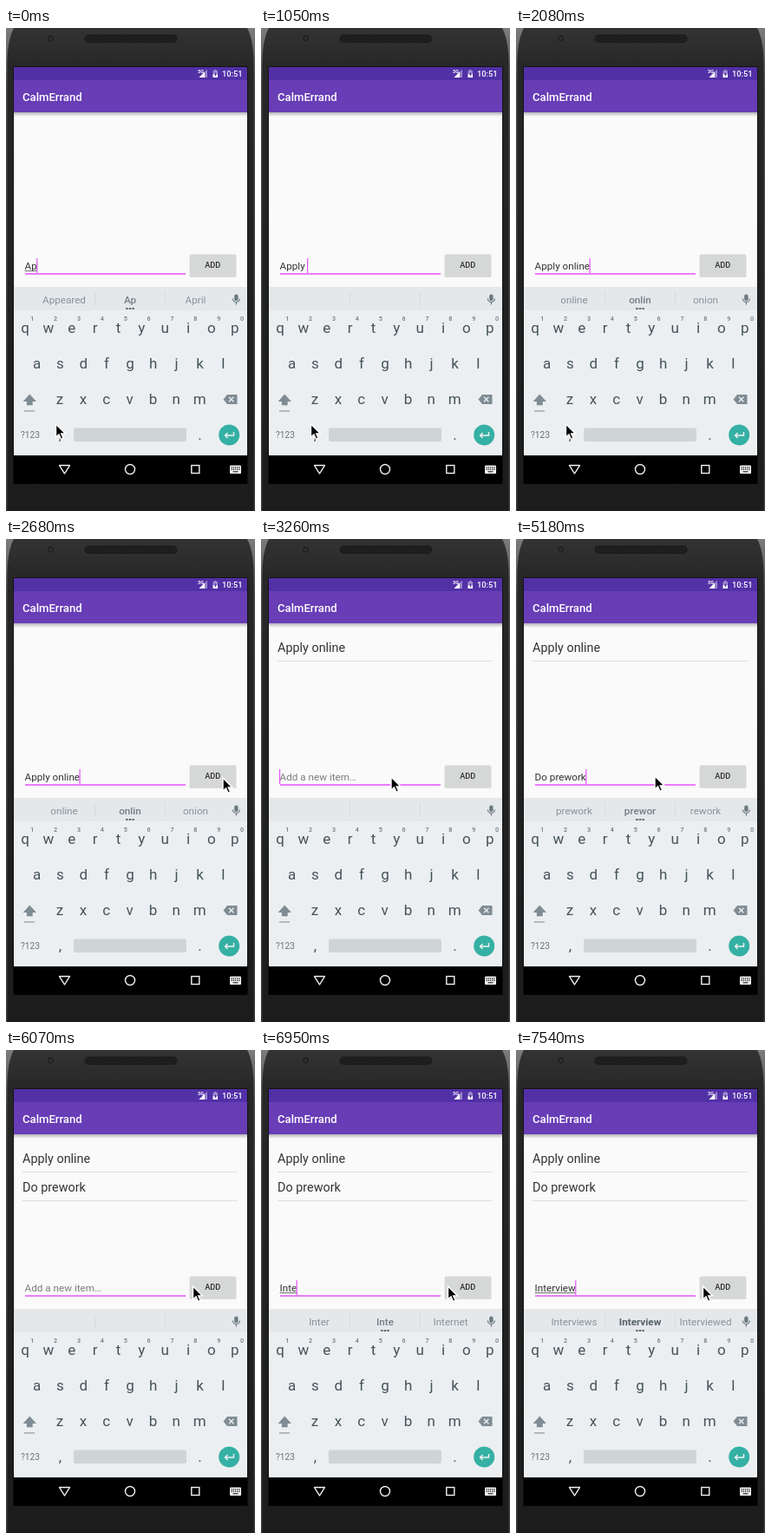
These frames come from a looping animation (287 by 556 pixels, 7990 ms). An HTML page:

```html
<!DOCTYPE html>
<html lang="en">
<head>
<meta charset="utf-8">
<title>To-do list demo</title>
<style>
html, body { margin: 0; width: 100%; height: 100%; overflow: hidden; background: #1d1d1d; }
svg { display: block; width: 287px; height: 556px; font-family: Roboto, sans-serif; }
text { white-space: pre; }
.mid { text-anchor: middle; }
.key { font-size: 17px; fill: #45535a; }
.digit { font-size: 7.2px; font-weight: 500; fill: #6c7a80; }
.hint { font-size: 11.7px; fill: #899298; }
.line { fill: none; stroke: #f2f2f2; stroke-width: 1.4; }
</style>
</head>
<body>
<svg viewBox="0 0 287 556">
  <defs>
    <linearGradient id="rim" x2="0" y2="1">
      <stop offset="0" stop-color="#7c7c7c"/>
      <stop offset=".12" stop-color="#4a4a4a"/>
      <stop offset="1" stop-color="#3c3c3c"/>
    </linearGradient>
    <linearGradient id="body" x2="0" y2="1">
      <stop offset="0" stop-color="#333"/>
      <stop offset=".08" stop-color="#272727"/>
      <stop offset="1" stop-color="#1c1c1c"/>
    </linearGradient>
    <linearGradient id="shade" x2="0" y2="1">
      <stop offset="0" stop-opacity=".28"/>
      <stop offset="1" stop-opacity="0"/>
    </linearGradient>
    <pattern id="mesh" width="4" height="4" patternUnits="userSpaceOnUse">
      <rect width="4" height="4" fill="#191919"/>
      <path d="M0 0L4 4M4 0L0 4" stroke="#262626" stroke-width=".8"/>
    </pattern>
  </defs>

  <!-- phone -->
  <rect width="287" height="556" fill="url(#rim)"/>
  <path d="M1.500 556V42Q1.500 14 9 0H278Q285.500 14 285.500 42V556Z" fill="url(#body)"/>
  <circle cx="51.500" cy="12" r="4.300" fill="#222" stroke="#363636"/>
  <circle cx="51.500" cy="12" r="1.500" fill="#33363a"/>
  <rect x="91" y="8" width="106" height="8.500" rx="4.200" fill="url(#mesh)" stroke="#1a1a1a"/>
  <rect x="8.500" y="44.500" width="270" height="480" fill="#000"/>

  <!-- status bar and toolbar -->
  <rect x="9" y="45" width="269" height="15.500" fill="#5230a6"/>
  <rect x="9" y="60" width="269" height="37" fill="#683db6"/>
  <text x="221" y="52" font-size="5.500" font-weight="700" fill="#fff">3G</text>
  <path d="M232 47.500V57H222.500Z" fill="#fff" opacity=".4"/>
  <path d="M229 50.500V57H222.500Z" fill="#fff"/>
  <path d="M240 48h2.500v1.200h1.500V53h-5.500V49.200h1.500Z" fill="#fff" opacity=".45"/>
  <path d="M238.500 53H244V57H238.500Z" fill="#fff"/>
  <path d="M241.800 50.500l-2 3.300h1.300v2.200l2-3.300h-1.300Z" fill="#5230a6"/>
  <text x="249" y="56.200" font-size="9.300" font-weight="500" fill="#fff">10:51</text>
  <text x="19" y="83.700" font-size="13.100" font-weight="500" fill="#fff">CalmErrand</text>

  <!-- content -->
  <rect x="9" y="97" width="269" height="201" fill="#fafafa"/>
  <rect x="9" y="97" width="269" height="5" fill="url(#shade)"/>
  <g id="items"></g>
  <rect x="22" y="282.300" width="185" height="1.500" fill="#e654fa"/>
  <text id="field" x="21.600" y="278" font-size="11.700"></text>
  <rect id="under" x="22" y="279.300" height=".8" fill="#444"/>
  <rect id="caret" y="265" width="1.200" height="17" fill="#e654fa"/>
  <rect x="211.500" y="261" width="54" height="26" rx="1.500" opacity=".13"/>
  <rect x="212" y="260.500" width="53" height="25.300" rx="1.500" fill="#d6d7d7"/>
  <text class="mid" x="238.300" y="276.300" font-size="9.160" font-weight="500" fill="#2c2c2c">ADD</text>

  <!-- keyboard -->
  <rect x="9" y="298" width="269" height="194" fill="#eceff1"/>
  <rect x="9" y="298" width="269" height="27" fill="#e4e8eb"/>
  <path d="M102.500 304V320M183.500 304V320" stroke="#d6dbde"/>
  <g id="hints"></g>
  <path id="dots" d="M138.200 323h2.400M141.800 323h2.400M145.400 323h2.400" stroke="#5d696f" stroke-width="2"/>
  <g stroke="#6c7a80" fill="none" stroke-width="1.200">
    <rect x="263.800" y="307" width="3.200" height="6.500" rx="1.600" fill="#6c7a80"/>
    <path d="M261.400 311.500a4 4 0 0 0 8 0M265.400 315.500V318.500"/>
  </g>
  <g id="keys"></g>
  <path d="M27.300 421.500L35 430H30.700V434.300H23.900V430H19.600Z" fill="#7f8c93"/>
  <rect x="21" y="440.300" width="12" height="1.200" fill="#8d999f"/>
  <path d="M250.500 427.500L255 422H266.500V433H255Z" fill="#7f8c93"/>
  <path d="M257 424.800l5.400 5.400m0-5.400l-5.400 5.400" stroke="#eceff1" stroke-width="1.300"/>
  <text x="17" y="472" font-size="10.200" fill="#66737a">?123</text>
  <rect x="78" y="460.500" width="130" height="15.500" rx="2" fill="#cfd4d7"/>
  <circle cx="257.200" cy="468.500" r="12" fill="#35b0a4"/>
  <path d="M262.500 465V469H252.500M255.500 466L252.500 469L255.500 472" class="line"/>

  <!-- navigation bar -->
  <rect x="9" y="492" width="269" height="32.500" fill="#000"/>
  <path class="line" stroke-linejoin="round" d="M61.500 503.500H73.500L67.500 513Z"/>
  <circle class="line" cx="143" cy="508" r="5.500"/>
  <rect class="line" x="213.800" y="503.500" width="9" height="9"/>
  <rect x="258" y="503.500" width="13" height="9.500" rx="1" fill="#f2f2f2"/>
  <path d="M259.500 505.800H270M259.500 508.200H270" stroke="#000" stroke-width="1.200" stroke-dasharray="1.200 1"/>
  <path d="M261.500 510.800H267.500" stroke="#000"/>

  <path id="mouse" d="M0 0V15L3.500 11.800L6 17.300L8.600 16.200L6.200 10.900H11Z" fill="#000" stroke="#fff" stroke-width="1.400"/>
</svg>
<script>
const LOOP = 7990, LEFT = 21.6;
const $ = id => document.getElementById(id);

function add(parent, tag, attrs, text = '') {
  const el = document.createElementNS('http://www.w3.org/2000/svg', tag);
  for (const k in attrs) el.setAttribute(k, attrs[k]);
  el.textContent = text;
  return parent.appendChild(el);
}

function keyRow(chars, x, y, cls = 'key') {
  [...chars].forEach((c, i) => add($('keys'), 'text', { x: x + i * 26.86, y, class: cls + ' mid' }, c));
}
keyRow('qwertyuiop', 22, 351.3);
keyRow('1234567890', 30.3, 336.5, 'digit');
keyRow('asdfghjkl', 35.5, 392.3);
keyRow('zxcvbnm', 62, 433.3);
keyRow(',', 62.5, 473.7);
keyRow('.', 223.5, 473.5);

const items = ['Apply online', 'Do prework'].map((name, i) => {
  const g = add($('items'), 'g', {}), y = 129.6 + i * 33;
  add(g, 'text', { x: 19, y, 'font-size': 14.4, fill: '#333' }, name);
  add(g, 'rect', { x: 19, y: y + 10.4, width: 247.5, height: 0.9, fill: '#dcdcdc' });
  return g;
});
const hints = [67, 143, 218.5].map(x => add($('hints'), 'text', { x, y: 317, class: 'hint mid' }));

// time, text, composed length, suggestions (* marks a correction)
const typing = [
  [0, 'Ap', 2, 'Appeared Ap April'],
  [300, 'App', 3, 'Apple App Approved'],
  [450, 'Appl', 4, 'Apple Appl Applying'],
  [600, 'Appl', 4, 'Applied Appl Apple'],
  [750, 'Apply', 0, 'Applied Appl Apple'],
  [1050, 'Apply ', 0, ''],
  [1200, 'Apply o', 0, ''],
  [1350, 'Apply on', 2, 'of on one'],
  [1490, 'Apply onl', 3, 'only onl once'],
  [1640, 'Apply onli', 4, 'online onli only'],
  [1790, 'Apply onlin', 0, 'online onli only'],
  [1930, 'Apply onlin', 5, 'online onlin onion'],
  [2080, 'Apply online', 0, 'online onlin onion'],
  [2820, '', 0, ''],
  [3410, 'D', 0, ''],
  [3560, 'D', 1, 'Do D Did'],
  [3700, 'Do', 0, 'Do D Did'],
  [3850, 'Do', 2, 'Don Do Does'],
  [4000, 'Do ', 0, ''],
  [4150, 'Do p', 0, ''],
  [4290, 'Do pre', 3, 'pretty pre present'],
  [4440, 'Do prew', 4, 'preview prew prewar'],
  [4590, 'Do prewo', 5, 'prework prewo prewar'],
  [4740, 'Do prewor', 6, 'prework prewor rework'],
  [4890, 'Do prework', 0, 'prework prewor rework'],
  [5620, '', 0, ''],
  [6510, 'I', 0, ''],
  [6660, 'In', 2, 'Is In Inn'],
  [6810, 'Int', 3, 'Into Int Inter'],
  [6950, 'Inte', 4, 'Inter Inte Internet'],
  [7100, 'Inter', 5, 'Internet *Inter Interest'],
  [7250, 'Interv', 6, 'Interval Interv Interview'],
  [7390, 'Intervie', 8, 'Interview Intervie Interviews'],
  [7540, 'Interview', 9, 'Interviews *Interview Interviewed']
];

// time, x, y
const pointer = [
  [0, 57.5, 456], [2230, 76, 432], [2380, 140, 360], [2530, 212, 296], [2670, 250, 275],
  [2970, 230, 275], [3110, 182, 274], [3260, 150, 274],
  [5180, 160, 273], [5330, 192, 272], [5480, 215.5, 272]
];

const at = (list, t) => list.findLast(row => row[0] <= t);
const show = (el, on) => el.setAttribute('visibility', on ? 'visible' : 'hidden');

function draw(t) {
  const [, text, composed, words] = at(typing, t);
  const [, x, y] = at(pointer, t);
  const field = $('field');

  const endOf = str => {
    field.textContent = str;
    return LEFT + (str ? field.getComputedTextLength() : 0);
  };
  const from = endOf(text.slice(0, text.length - composed));
  const end = endOf(text);
  $('under').setAttribute('x', from);
  $('under').setAttribute('width', composed ? end - from : 0);
  $('caret').setAttribute('x', end - 0.6);
  show($('caret'), t < 6070 || t >= 6510);
  field.textContent = text || 'Add a new item…';
  field.setAttribute('fill', text ? '#333' : '#7d7d7d');

  const parts = words.split(' ');
  hints.forEach((el, i) => {
    const word = parts[i] || '', strong = word[0] === '*';
    el.textContent = word.replace('*', '');
    el.style.fontWeight = strong ? 700 : i === 1 ? 500 : 400;
    el.style.fill = strong ? '#566268' : i === 1 ? '#737e84' : '';
  });
  show($('dots'), words);

  show(items[0], t >= 2820);
  show(items[1], t >= 5620);
  $('mouse').setAttribute('transform', `translate(${x} ${y})`);
}

const start = performance.now();
function frame(now) {
  draw(Math.max(0, now - start) % LOOP);
  requestAnimationFrame(frame);
}
draw(0);
requestAnimationFrame(frame);
</script>
</body>
</html>
```
